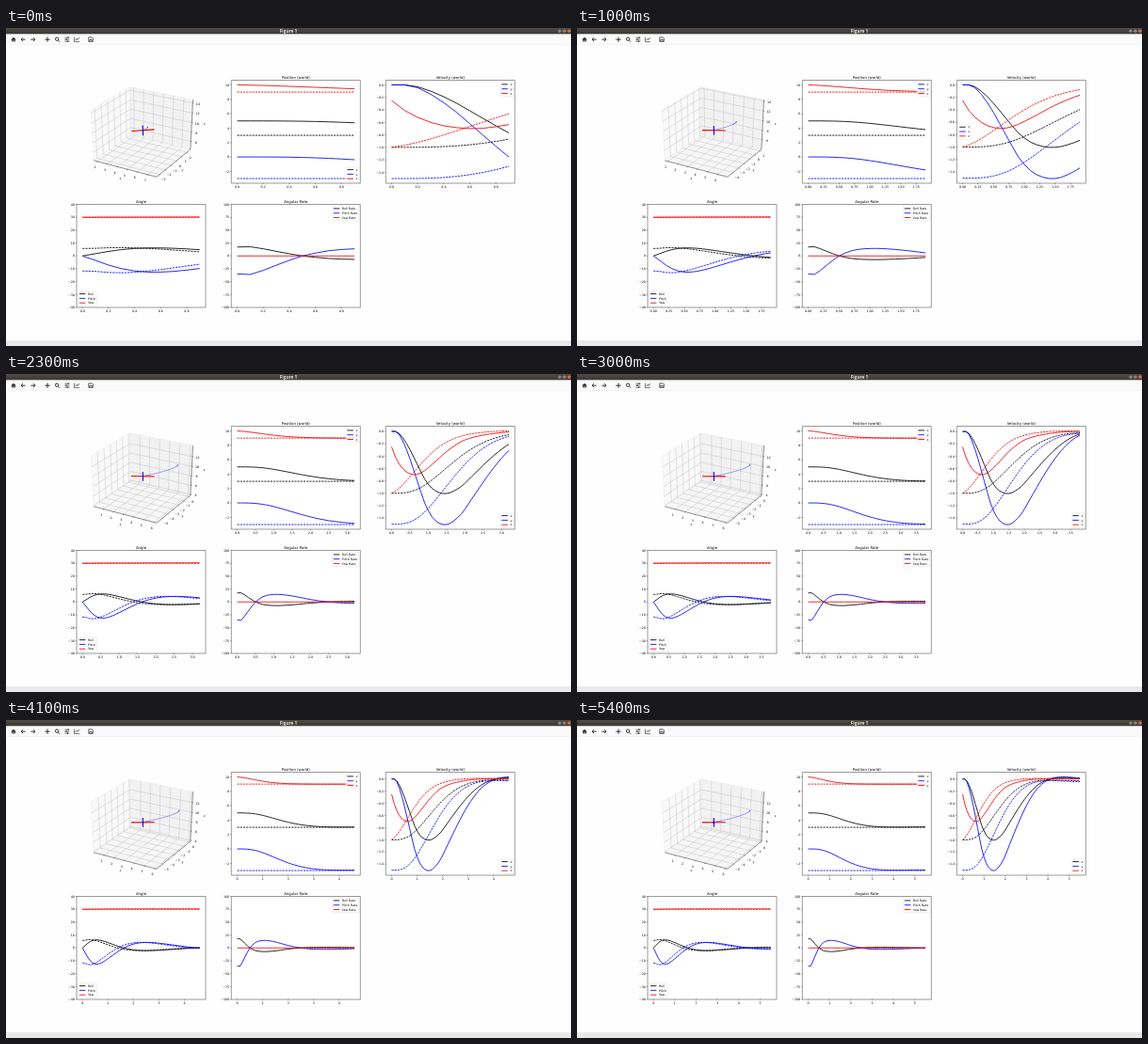
Recreate the animation shown at these times as an HTML page. Size 600 by 338 pixels, loop 5.5 s.

```html
<!DOCTYPE html>
<html>
<head>
<meta charset="utf-8">
<style>
html, body { margin: 0; width: 100%; height: 100%; overflow: hidden; background: #fff; }
svg { display: block; width: 600px; height: 338px; }
text { font-family: "DejaVu Sans", sans-serif; }
.win { font-family: "Open Sans", sans-serif; font-weight: 700; }
</style>
</head>
<body>
<svg viewBox="0 0 600 338">
  <defs>
    <linearGradient id="bar" x2="0" y2="1">
      <stop offset="0" stop-color="#504b45"/><stop offset="1" stop-color="#3a3733"/>
    </linearGradient>
  </defs>
  <rect width="600" height="338" fill="#fefefe"/>
  <rect width="600" height="6.6" fill="url(#bar)"/>
  <text class="win" x="300" y="5" font-size="4.7" text-anchor="middle" fill="#e6e2da">Figure 1</text>
  <g fill="#8a857c"><circle cx="588" cy="3.2" r="1.7"/><circle cx="593" cy="3.2" r="1.7"/></g>
  <circle cx="598" cy="3.2" r="1.7" fill="#df6a45"/>
  <rect y="6.6" width="600" height="11" fill="#fafafa"/>
  <path d="M0 17.6H600" stroke="#efefef" stroke-width=".5"/>
  <g fill="none" stroke="#222" stroke-width=".9">
    <path d="M5.6 12.2 8 9.9 10.4 12.2Z M6.4 12v2.3h1.1v-1.6h1v1.6h1.1V12Z" fill="#222" stroke-width=".3"/>
    <path d="M20.6 12.2H16.2M18 10.3 16 12.2 18 14.1"/>
    <path d="M26.4 12.2H30.8M29 10.3 31 12.2 29 14.1"/>
    <path d="M41.4 12.2H46.6M44 9.6V14.8"/>
    <path d="M55.4 13.1 57 14.7"/><circle cx="54.1" cy="11.7" r="1.7"/>
    <path d="M62.4 10.2H67.4M62.4 12.2H67.4M62.4 14.2H67.4" stroke-width=".6"/>
    <path d="M66 9.4V11M64 11.4V13M65.4 13.4V15"/>
    <path d="M72.4 9.6V14.6H78" stroke-width=".6"/><path d="M73.4 13.2 75 11.4 76.2 12.4 77.8 10.2" stroke-width=".7"/>
    <path d="M87.8 9.9H91.4L92.3 10.8V14.4H87.8Z M88.8 14.2V12.5H91.2V14.2" stroke-width=".7"/>
  </g>
  <rect y="332" width="600" height="6" fill="#e9e9e9"/>
  <g id="plots"></g>
</svg>
<script>
const plots = document.getElementById('plots');
const K = '#000', B = '#00f', R = '#f00000';
const LOOP = 5500, DT = 0.1, COUNT = 56, EM = 3.25;
const AW = 137, AH = 109.5, RAD = Math.PI / 180;

// smooth curve through t,v pairs, sampled every DT
function sample(p) {
  const n = p.length / 2, t = i => p[2 * i], v = i => p[2 * i + 1];
  const slope = i => {
    const a = Math.max(i - 1, 0), b = Math.min(i + 1, n - 1);
    return (v(b) - v(a)) / (t(b) - t(a));
  };
  return Array.from({ length: COUNT }, (_, k) => {
    const x = k * DT;
    let i = 0;
    while (i < n - 2 && t(i + 1) <= x + 1e-9) i++;
    const h = t(i + 1) - t(i), s = (x - t(i)) / h, q = 1 - s;
    return v(i) * (1 + 2 * s) * q * q + slope(i) * h * s * q * q +
      v(i + 1) * s * s * (3 - 2 * s) - slope(i + 1) * h * s * s * q;
  });
}
function integrate(a, start) {
  let sum = start;
  return a.map((v, i) => i ? sum += (a[i - 1] + v) / 2 * DT : sum);
}
const scale = (a, k) => a.map(v => v * k);
const toward = (pos, goal, gain) => pos.map(p => gain * (goal - p));
const flat = v => Array(COUNT).fill(v);

const vx = sample([0, 0, .1, 0, .2, -.03, .3, -.1, .4, -.19, .5, -.295, .6, -.415, .7, -.535, .8, -.655,
  .9, -.77, 1.1, -.92, 1.3, -.99, 1.45, -1.005, 1.6, -.99, 1.9, -.89, 2.2, -.72, 2.6, -.49, 2.9, -.335,
  3.2, -.205, 3.5, -.105, 3.8, -.04, 4.1, 0, 4.4, .018, 4.8, .023, 5.5, .01]);
const vy = scale(vx, 1.5);
const vz = sample([0, -.25, .1, -.41, .2, -.52, .3, -.6, .4, -.655, .5, -.685, .6, -.7, .7, -.695, .8, -.67,
  .9, -.635, 1.2, -.485, 1.4, -.375, 1.6, -.28, 1.9, -.165, 2.2, -.1, 2.6, -.05, 3.2, -.01, 3.8, 0, 5.5, 0]);
const px = integrate(vx, 5), py = integrate(vy, 0), pz = integrate(vz, 10);

const pitchRate = sample([0, -35, .1, -36, .2, -28, .3, -18, .4, -8.5, .5, 0, .6, 5.5, .7, 10, .8, 12.5,
  .9, 13.8, 1.1, 14.6, 1.3, 13.5, 1.5, 11.5, 1.7, 8.9, 1.9, 6, 2.1, 3.6, 2.3, 1.5, 2.5, 0, 2.8, -1.8,
  3.2, -2.6, 3.8, -2.6, 4.4, -1.8, 5, -.7, 5.5, 0]);
const pitch = [0];
for (let i = 1; i < COUNT; i++) pitch[i] = pitch[i - 1] + pitchRate[i - 1] * DT;
const pitchGoal = pitchRate.map((r, i) => (i ? pitch[i - 1] : 0) + r / 3);
const SIDE = -.494;
const roll = scale(pitch, SIDE);
const yaw = flat(0).map((_, i) => 30 + .3 * (1 - Math.exp(-i * DT)));

const f = v => v.toFixed(2);
const line = (d, c, w, extra = '') => `<path d="${d}" fill="none" stroke="${c}" stroke-width="${w}" ${extra}/>`;
const poly = pts => 'M' + pts.map(p => f(p[0]) + ' ' + f(p[1])).join('L');
const label = (x, y, s, size = EM, anchor = 'middle') =>
  `<text x="${f(x)}" y="${f(y)}" font-size="${size}" text-anchor="${anchor}">${s}</text>`;
const num = (v, digits) => (Math.abs(v) < 1e-9 ? 0 : v).toFixed(digits).replace('-', '\u2212');

function ticks(lo, hi, step) {
  const out = [];
  for (let i = Math.ceil(lo / step - 1e-9); i * step <= hi + 1e-9; i++) out.push(i * step);
  return out;
}

function legend(ax, names, textEm, place) {
  const w = (3.6 + textEm) * EM, h = 15.6, gap = 1.6;
  const x = place.includes('r') ? ax.x + AW - gap - w : ax.x + gap;
  const y = place.includes('t') ? ax.y + gap : place.includes('b') ? ax.y + AH - gap - h : ax.y + (AH - h) / 2;
  let s = `<rect x="${f(x)}" y="${f(y)}" width="${f(w)}" height="${h}" rx=".6" fill="#fff" fill-opacity=".8" stroke="#ccc" stroke-width=".3"/>`;
  names.forEach((name, i) => {
    const cy = y + 2.8 + i * 4.8;
    s += line(`M${f(x + 1.3)} ${f(cy)}h${2 * EM}`, [K, B, R][i], .85);
    s += label(x + 3.2 * EM, cy + 1.1, name, EM, 'start');
  });
  return s;
}

function chart(ax, last) {
  const end = last * DT, span = end * 1.1;
  const X = t => ax.x + AW * (t + end * .05) / span;
  let [lo, hi] = ax.range || [Infinity, -Infinity];
  if (!ax.range) {
    for (const [a] of ax.lines) for (let i = 0; i <= last; i++) {
      lo = Math.min(lo, a[i]);
      hi = Math.max(hi, a[i]);
    }
    const pad = (hi - lo) * .05;
    lo -= pad;
    hi += pad;
  }
  const Y = v => ax.y + AH * (hi - v) / (hi - lo);
  const bottom = ax.y + AH;
  let s = `<rect x="${ax.x}" y="${ax.y}" width="${AW}" height="${AH}" fill="#fff"/>`, marks = '';
  for (const [a, c, dashed] of ax.lines) {
    const pts = a.slice(0, last + 1).map((v, i) => [X(i * DT), Y(v)]);
    s += line(poly(pts), c, .85, dashed ? 'stroke-dasharray="2.2 1"' : 'stroke-linejoin="round"');
  }
  const step = [.1, .2, .25, .5, 1].find(k => span / k <= 9);
  for (const t of ticks(0, end * 1.05, step)) {
    marks += `M${f(X(t))} ${bottom}v1.1`;
    s += label(X(t), bottom + 5, num(t, step === 1 ? 0 : step === .25 ? 2 : 1));
  }
  for (const v of ticks(lo, hi, ax.step)) {
    marks += `M${ax.x} ${f(Y(v))}h-1.1`;
    s += label(ax.x - 2.2, Y(v) + 1.2, num(v, ax.step < 1 ? 1 : 0), EM, 'end');
  }
  s += line(marks + `M${ax.x} ${ax.y}h${AW}v${AH}h${-AW}Z`, K, .4);
  s += label(ax.x + AW / 2, ax.y - 2, ax.title, 3.9);
  return s + legend(ax, ax.names, ax.textEm, ax.place(end + 1e-6));
}

const xyz = ['x', 'y', 'z'];
const charts = [
  { x: 239.3, y: 55.5, title: 'Position (world)', step: 2, names: xyz, textEm: .6,
    place: t => t < 1.5 ? 'br' : 'tr',
    lines: [[px, K], [py, B], [pz, R], [flat(3), K, 1], [flat(-3), B, 1], [flat(9), R, 1]] },
  { x: 403.3, y: 55.5, title: 'Velocity (world)', step: .2, names: xyz, textEm: .6,
    place: t => t < 1.5 ? 'tr' : t < 2 ? 'l' : 'br',
    lines: [[vx, K], [vy, B], [vz, R],
      [toward(px, 3, .5), K, 1], [toward(py, -3, .5), B, 1], [toward(pz, 9, 1), R, 1]] },
  { x: 75, y: 187.5, title: 'Angle', step: 10, range: [-40, 40], names: ['Roll', 'Pitch', 'Yaw'], textEm: 2.46,
    place: () => 'bl',
    lines: [[roll, K], [pitch, B], [yaw, R], [scale(pitchGoal, SIDE), K, 1], [pitchGoal, B, 1], [flat(30), R, 1]] },
  { x: 239.3, y: 187.5, title: 'Angular Rate', step: 25, range: [-100, 100],
    names: ['Roll Rate', 'Pitch Rate', 'Yaw Rate'], textEm: 5.09, place: () => 'tr',
    lines: [[scale(pitchRate, SIDE), K], [pitchRate, B], [flat(0), R]] }
];

// perspective view of a unit cube centred on the vehicle
function project([x, y, z]) {
  const k = 10 / (10 - (.433 * x - .75 * y + .5 * z));
  return [145.35 + 74 * k * (.866 * x + .5 * y), 108.8 - 59.2 * k * (-.25 * x + .433 * y + .866 * z)];
}

function scene(last) {
  const H = .5208, c = [px[last], py[last], pz[last]], half = [3, 3, 5];
  const unit = p => p.map((v, i) => (v - c[i]) / (2 * half[i]));
  const path = pts => poly(pts.map(project));
  const pane = (fill, pts) => `<path d="${path(pts)}Z" fill="${fill}" stroke="#ddd" stroke-width=".3"/>`;
  let s = pane('#f9f9f9', [[-H, -H, -H], [-H, H, -H], [-H, H, H], [-H, -H, H]]) +
    pane('#f2f2f2', [[-H, H, -H], [H, H, -H], [H, H, H], [-H, H, H]]) +
    pane('#f6f6f6', [[-H, -H, -H], [H, -H, -H], [H, H, -H], [-H, H, -H]]);
  const grids = [
    v => [[v, -H, -H], [v, H, -H], [v, H, H]],
    v => [[H, v, -H], [-H, v, -H], [-H, v, H]],
    v => [[H, H, v], [-H, H, v], [-H, -H, v]]
  ];
  const shift = [[-2.5, 7.4], [4, 6.6], [5.6, 2.2]], nib = [[-.4, .9], [.8, .6], [1, .2]];
  let grid = '', axes = path([[-H, -H, -H], [H, -H, -H], [H, H, -H], [H, H, H]]);
  grids.forEach((g, i) => {
    for (const v of ticks(c[i] - half[i], c[i] + half[i], i === 2 ? 2 : 1)) {
      const pts = g((v - c[i]) / (2 * half[i]));
      grid += path(pts);
      const [x, y] = project(pts[0]);
      axes += `M${f(x)} ${f(y)}l${nib[i]}`;
      s += label(x + shift[i][0], y + shift[i][1], num(v, 0));
    }
  });
  s += line(grid, '#bcbcc2', .4) + line(axes, K, .4);
  s += label(121.5, 161.2, 'x') + label(187.5, 152.2, 'y') + label(210.5, 103.2, 'z');

  const trail = [];
  for (let i = 0; i <= last; i++) trail.push(project(unit([px[i], py[i], pz[i]])));
  s += line(poly(trail), B, .4, 'opacity=".6"');
  s += line(trail.map(p => `M${f(p[0])} ${f(p[1])}h.01`).join(''), B, .7, 'stroke-linecap="round" opacity=".45"');

  const a = roll[last] * RAD, b = pitch[last] * RAD, w = yaw[last] * RAD;
  const { sin, cos } = Math;
  const arm = (d, color) => {
    const end = k => project(d.map((v, i) => k * v / (2 * half[i])));
    return line(poly([end(-1), end(1)]), color, 1.1);
  };
  s += arm([cos(w) * cos(b), sin(w) * cos(b), -sin(b)], R);
  s += arm([cos(w) * sin(b) * sin(a) - sin(w) * cos(a), sin(w) * sin(b) * sin(a) + cos(w) * cos(a), cos(b) * sin(a)], B);
  return s;
}

// frame / sample pairs: the plotting slows as data grows
const pace = [[0, 9], [10, 19], [16, 26], [23, 32], [30, 38], [41, 46], [54, 55]];
function lastAt(n) {
  let i = 0;
  while (i < pace.length - 2 && pace[i + 1][0] <= n) i++;
  const [n0, a] = pace[i], [n1, b] = pace[i + 1];
  return Math.round(a + (b - a) * (n - n0) / (n1 - n0));
}

let shown = -1;
function render(ms) {
  const last = lastAt(Math.floor((ms % LOOP) / 100));
  if (last === shown) return;
  shown = last;
  plots.innerHTML = scene(last) + charts.map(ax => chart(ax, last)).join('');
}
let start = null;
function tick(now) {
  if (start === null) start = now;
  render(Math.max(0, now - start));
  requestAnimationFrame(tick);
}
render(0);
requestAnimationFrame(tick);
</script>
</body>
</html>
```
